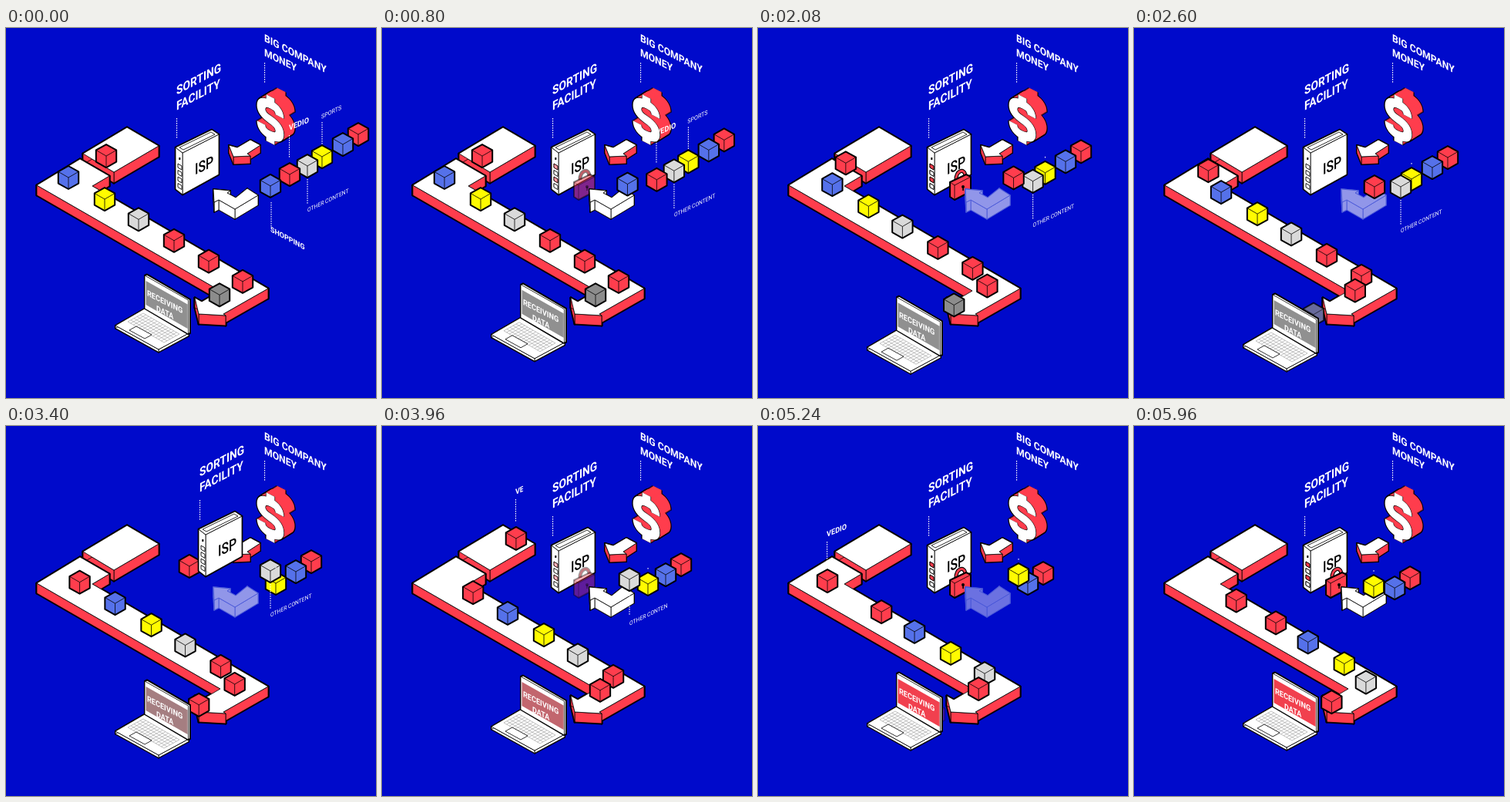
Write an HTML page with a canvas that moves like this. It is 480 by 480 pixels and loops after 6000 ms.

```html
<!DOCTYPE html>
<html lang="en">
<head>
<meta charset="utf-8">
<title>Sorting facility</title>
<style>
html, body { margin: 0; width: 100%; height: 100%; overflow: hidden; background: #000acb; }
canvas { display: block; width: 480px; height: 480px; }
</style>
</head>
<body>
<canvas id="stage"></canvas>
<script>
const LOOP = 6000;
const BG = [0, 10, 203];
const RED = '#ff3d4d', BLUE = '#5571ea', YELLOW = '#fffb00', GREY = '#dadada', DIM = '#8c8c8c';
const canvas = document.getElementById('stage');
const ctx = canvas.getContext('2d');
const ratio = window.devicePixelRatio || 1;
canvas.width = canvas.height = 480 * ratio;

// Linear interpolation in a table of [key, value, value...] rows.
function at(table, t) {
  let i = 1;
  while (i < table.length - 1 && table[i][0] < t) i++;
  const a = table[i - 1], b = table[i];
  const k = Math.min(1, Math.max(0, (t - a[0]) / (b[0] - a[0])));
  return a.slice(1).map((v, n) => v + (b[n + 1] - v) * k);
}
const num = (table, t) => at(table, t)[0];
const mix = (a, b, k) => 'rgb(' + a.map((v, i) => Math.round(v + (b[i] - v) * k)).join() + ')';

function trace(pts) {
  ctx.beginPath();
  pts.forEach(p => ctx.lineTo(p[0], p[1]));
  ctx.closePath();
}
function poly(pts, fill, width = 0, line = '#000') {
  trace(pts);
  if (fill) { ctx.fillStyle = fill; ctx.fill(); }
  if (width) { ctx.lineWidth = width; ctx.strokeStyle = line; ctx.stroke(); }
}
function prism(top, depth, side, face = '#fff', outer = 3, line = '#000') {
  const walls = top.map((p, i) => {
    const q = top[(i + 1) % top.length];
    return [p, q, [q[0], q[1] + depth], [p[0], p[1] + depth]];
  });
  walls.forEach(w => poly(w, side, outer, line));
  poly(top, face, outer, line);
  walls.forEach(w => poly(w, side, 0.8, line));
  poly(top, face, 0.8, line);
}
function group(x, y, draw, alpha = 1) {
  if (alpha <= 0) return;
  ctx.save();
  ctx.translate(x, y);
  ctx.globalAlpha *= alpha;
  draw();
  ctx.restore();
}
function slant(str, x, y, size, weight, scale, slope, color = '#fff', align = 'left') {
  ctx.save();
  ctx.transform(scale, scale * slope, 0, 1, x, y);
  ctx.font = `${weight} ${size}px Roboto, Inter, sans-serif`;
  ctx.textAlign = align;
  ctx.fillStyle = color;
  ctx.fillText(str, 0, 0);
  ctx.restore();
}
function dots(x, y1, y2) {
  ctx.fillStyle = '#fff';
  for (let y = y1; y < y2; y += 3) ctx.fillRect(x - 0.5, y, 1.1, 1.6);
}
function cube(x, y, color, alpha = 1) {
  group(x, y, () => {
    poly([[0, -15], [13.2, -7.6], [13.2, 7.6], [0, 15], [-13.2, 7.6], [-13.2, -7.6]], color, 2);
    ctx.beginPath();
    ctx.moveTo(-13, -7.5); ctx.lineTo(0, 0); ctx.lineTo(13, -7.5);
    ctx.moveTo(0, 0); ctx.lineTo(0, 15);
    ctx.lineWidth = 0.8;
    ctx.stroke();
  }, alpha);
}

// Conveyor

const platform = [[157, 129], [198, 153], [140, 187], [100, 163]];
const belt = [[40, 204], [96, 170], [134, 192], [112, 205], [340, 338], [282, 371], [285, 373],
  [250, 371], [245, 350], [254, 355], [278, 341]];
const travel = [[0, 0], [1600, 0], [2600, 32], [3400, 60.5], [3960, 82], [5240, 122], [6000, 146]];
const exitWarp = [[226, 226], [242, 236], [264, 250], [282, 277], [300, 300], [330, 330]];
const load = [[-49, RED, 1.05], [0, BLUE], [47, YELLOW], [91, GREY], [137, RED], [182, RED],
  [226, RED], [268, DIM]];

function beltPoint(p) {
  if (p < 0) return [81 - p, 194 + p * 0.57];
  if (p <= 226) return [81 + p, 194 + p * 0.597];
  const q = num(exitWarp, p) - 226;
  return [307 - q, 329 + q * 0.577];
}
function conveyor(t) {
  prism(platform, 14, RED);
  prism(belt, 13, RED);
  const d = num(travel, t);
  const cubes = load.map(([start, color, rate = 1]) => {
    const p = start + d * rate;
    return [...beltPoint(p), color, Math.min(1, (306 - p) / 8)];
  });
  const v = at(videoPath, t);
  if (t > 3900) cubes.push([...v, RED, 1]);
  cubes.sort((a, b) => a[1] - b[1]).forEach(c => cube(...c));
}

// Incoming train

const videoPath = [[0, 368, 190], [1520, 346, 203], [1750, 344, 187], [2600, 312, 206], [2880, 295, 216],
  [3400, 238, 182], [3960, 174, 146], [4020, 169, 143], [5130, 81, 194], [5240, 90, 201], [6000, 135, 228]];
const shopPath = [[0, 343, 205], [200, 342, 190], [1350, 297, 214], [1520, 291, 236], [1750, 291, 252]];
const otherPath = [[0, 391, 179], [1520, 368, 191], [2600, 346, 206], [3150, 344, 205], [3400, 343, 188],
  [3960, 321, 199], [4700, 292, 216], [4900, 291, 236], [5050, 291, 252]];
const sportPath = [[0, 410, 167], [1520, 386, 179], [2600, 360, 196], [3400, 350, 204], [3960, 345, 205],
  [4850, 344, 204], [5100, 342, 190], [5240, 338, 193], [6000, 309.5, 209]];
const tail = [[0, 437, 151], [1520, 412, 165], [2600, 387, 181], [3400, 376, 189], [3960, 368, 193],
  [5240, 350, 204], [6000, 337.5, 210.5]];
const sinkArea = [[269, 224], [327, 224], [327, 229], [297, 248], [269, 232]];

function sinking(path, t, color) {
  const [x, y] = at(path, t);
  if (y > 250) return;
  ctx.save();
  if (y > 220) { trace(sinkArea); ctx.clip(); }
  cube(x, y, color);
  ctx.restore();
}
function train(t) {
  const [bx, by] = at(tail, t);
  cube(bx + 20, by - 13, RED);
  cube(bx, by, BLUE);
  cube(...at(sportPath, t), YELLOW);
  sinking(otherPath, t, GREY);
  if (t < 3150) cube(...at(videoPath, t), RED);
  sinking(shopPath, t, BLUE);
}

// Labels that follow a cube and wipe in or out from the right

const shown = {
  video: [[0, 1], [1600, 1], [2000, 0], [3860, 0], [4150, 1], [5250, 1], [5650, 0]],
  sport: [[0, 1], [1150, 1], [1480, 0]],
  other: [[0, 1], [3900, 1], [4400, 0]],
  shop: [[0, 1], [250, 1], [750, 0]]
};
function wiped(x, width, k, draw) {
  if (k <= 0) return;
  ctx.save();
  ctx.beginPath();
  ctx.rect(x - 1, 0, (width + 2) * k, 480);
  ctx.clip();
  draw();
  ctx.restore();
}
function labels(t) {
  let k = num(shown.video, t), [x, y] = at(videoPath, t);
  wiped(x, 27, k, () => slant('VEDIO', x - 1, y - 57, 10, 700, 0.91, -0.41));
  dots(x - 0.5, y - 23 - 28 * Math.min(1, k * 3), y - 23);

  k = num(shown.sport, t); [x, y] = at(sportPath, t);
  wiped(x, 28, k, () => slant('SPORTS', x - 1, y - 49, 8, 400, 0.89, -0.48));
  dots(x, y - 21 - 24 * k, y - 20 + 3 * k);

  k = num(shown.other, t); [x, y] = at(otherPath, t);
  wiped(x, 55, k, () => slant('OTHER CONTENT', x, y + 60, 7.6, 400, 0.89, -0.48));
  dots(x, y + 17, y + 17 + 33 * k);

  k = num(shown.shop, t); [x, y] = at(shopPath, t);
  wiped(x, 46, k, () => slant('SHOPPING', x, y + 59, 9.6, 700, 0.93, 0.54));
  dots(x + 1, y + 21, y + 21 + 31 * k);
}

// Money

const payArrow = [[289, 152], [300, 155], [317, 145], [330, 152], [313, 163], [317, 166], [295, 167]];
const dollar = new Path2D('M12,-10Q12,-20 0,-20Q-12,-20 -12,-10Q-12,-2 0,0Q12,2 12,11Q12,20 0,20Q-12,20 -12,10M0,-30V-18M0,18V30');

function dollarStroke(dx, dy, width, color) {
  ctx.save();
  ctx.transform(1, 0.5, 0, 1, 343 + dx, 119 + dy);
  ctx.lineWidth = width;
  ctx.strokeStyle = color;
  ctx.stroke(dollar);
  ctx.restore();
}
function money() {
  slant('BIG COMPANY', 335, 17, 13.4, 700, 0.91, 0.52);
  slant('MONEY', 335, 36, 13.4, 700, 0.91, 0.49);
  dots(335.5, 45, 72);
  for (const [width, color] of [[13.5, '#000'], [11, RED]])
    for (let i = 14; i >= 0; i--) dollarStroke(i, -i * 0.62, width, color);
  dollarStroke(0, 0, 12.2, '#000');
  dollarStroke(0, 0, 10.8, '#fff');
  prism(payArrow, 10, RED, '#fff', 2);
}

// Sorting box, lock and entry arrow

const lockAlpha = [[0, 0], [650, 0], [950, 1], [2200, 1], [2500, 0], [3850, 0], [4150, 1], [6000, 1]];
const arrowAlpha = [[0, 1], [1150, 1], [1520, 0.57], [3500, 0.57], [3900, 1], [4700, 1], [5240, 0.42],
  [5450, 0.42], [5800, 1]];
const boxShift = [[0, 0], [3050, 0], [3200, 0.3], [3400, 1], [3600, 1], [3840, 0]];
const entryArrow = [[269, 209], [291, 211], [287, 214], [298, 220], [313, 208], [327, 217], [297, 235],
  [276, 223], [270, 226]];

function sorter(t) {
  const k = num(boxShift, t), lock = num(lockAlpha, t);
  group(30 * k, -21 * k, () => {
    slant('SORTING', 221, 87, 16, 700, 0.86, -0.53);
    slant('FACILITY', 221, 107, 16, 700, 0.86, -0.53);
    dots(221.5, 117, 143);
    const front = [[229, 162], [276, 138], [276, 190], [229, 216]];
    const side = [[220, 155], [229, 162], [229, 216], [220, 209]];
    const lid = [[220, 155], [267, 132], [276, 138], [229, 162]];
    [front, side, lid].forEach(f => poly(f, '#fff', 2.6));
    [front, side, lid].forEach(f => poly(f, '#fff', 0.8));
    poly([[225, 155], [266, 135], [271, 138], [230, 158]], '#fff', 0.8);
    slant('ISP', 257, 185, 20, 500, 0.79, -0.46, '#000', 'center');
    ctx.fillStyle = '#000';
    ctx.fillRect(224.3, 168, 2, 3);
    for (let i = 0; i < 4; i++) {
      const y = 176 + i * 8.5;
      const slot = [[223, y], [228, y + 3], [228, y + 8], [223, y + 5]];
      poly(slot, '#fff', 0.9);
      if (i % 3 < 3) group(0, 0, () => poly(slot, i === 1 || i === 3 ? '#fff' : RED, 0.9), lock);
    }
  });
  group(0, 0, padlock, lock);
}
function padlock() {
  ctx.beginPath();
  ctx.moveTo(257, 197);
  ctx.bezierCurveTo(256, 186, 268, 180, 269, 192);
  ctx.lineWidth = 5; ctx.strokeStyle = '#000'; ctx.stroke();
  ctx.lineWidth = 2.8; ctx.strokeStyle = RED; ctx.stroke();
  poly([[249, 200], [270, 190], [276, 193], [276, 212], [255, 223], [249, 219]], RED, 2);
  ctx.beginPath();
  ctx.moveTo(249, 200); ctx.lineTo(255, 204); ctx.lineTo(276, 193);
  ctx.moveTo(255, 204); ctx.lineTo(255, 223);
  ctx.lineWidth = 0.8; ctx.stroke();
  ctx.fillStyle = '#000';
  ctx.beginPath();
  ctx.arc(266, 206, 2, 0, 7);
  ctx.fill();
  ctx.fillRect(265.3, 206, 1.6, 5);
}
function entry(t) {
  const a = num(arrowAlpha, t);
  const fill = mix(BG, [255, 255, 255], a);
  const line = mix([70, 85, 215], [0, 0, 0], Math.max(0, (a - 0.57) / 0.43));
  prism(entryArrow, 13, fill, fill, 1.4, line);
}

// Laptop

const bob = [[0, 0], [640, 8], [1280, 23], [1520, 27], [1960, 29], [2600, 25], [3240, 13], [3400, 10],
  [3960, 4], [4600, 1], [5240, 0]];
const glow = [[0, 0], [3100, 0], [3400, 0.22], [3960, 0.52], [5240, 1]];

function laptop(t) {
  group(0, num(bob, t), () => {
    prism([[180, 364], [237, 396], [198, 417], [142, 386]], 3.5, '#fff', '#fff', 2);
    ctx.strokeStyle = '#999';
    ctx.lineWidth = 0.6;
    const key = (u, v) => ctx.lineTo(178 + 47 * u - 20 * v, 370 + 27 * u + 11 * v);
    ctx.beginPath();
    for (let r = 0; r <= 5; r++) { ctx.moveTo(178 - 4 * r, 370 + 2.2 * r); key(1, r / 5); }
    for (let c = 0; c <= 13; c++) {
      const u = c / 13;
      ctx.moveTo(178 + 47 * u, 370 + 27 * u);
      key(u, 1);
    }
    ctx.stroke();
    poly([[160, 392], [169, 387], [189, 398], [180, 403]], '#fff', 0.8);
    poly([[180, 321], [183, 319.5], [239, 352], [239, 396], [236, 397], [180, 364]], '#fff', 2);
    poly([[180, 321], [236.5, 353], [236.5, 397], [180, 364]], '#fff', 0.8);
    poly([[181.5, 328], [235.5, 358.5], [235.5, 390], [181.5, 359]],
      mix([144, 144, 144], [241, 64, 78], num(glow, t)));
    slant('RECEIVING', 183, 347, 10.4, 700, 0.88, 0.51);
    slant('DATA', 195, 367, 10.4, 700, 0.86, 0.5);
  });
}

function draw(t) {
  ctx.setTransform(ratio, 0, 0, ratio, 0, 0);
  ctx.lineJoin = 'round';
  ctx.fillStyle = mix(BG, BG, 0);
  ctx.fillRect(0, 0, 480, 480);
  conveyor(t);
  laptop(t);
  money();
  if (t >= 3150 && t <= 3900) cube(...at(videoPath, t), RED);
  sorter(t);
  entry(t);
  train(t);
  labels(t);
}

const start = performance.now();
function tick() {
  draw((performance.now() - start) % LOOP);
  requestAnimationFrame(tick);
}
tick();
</script>
</body>
</html>
```
